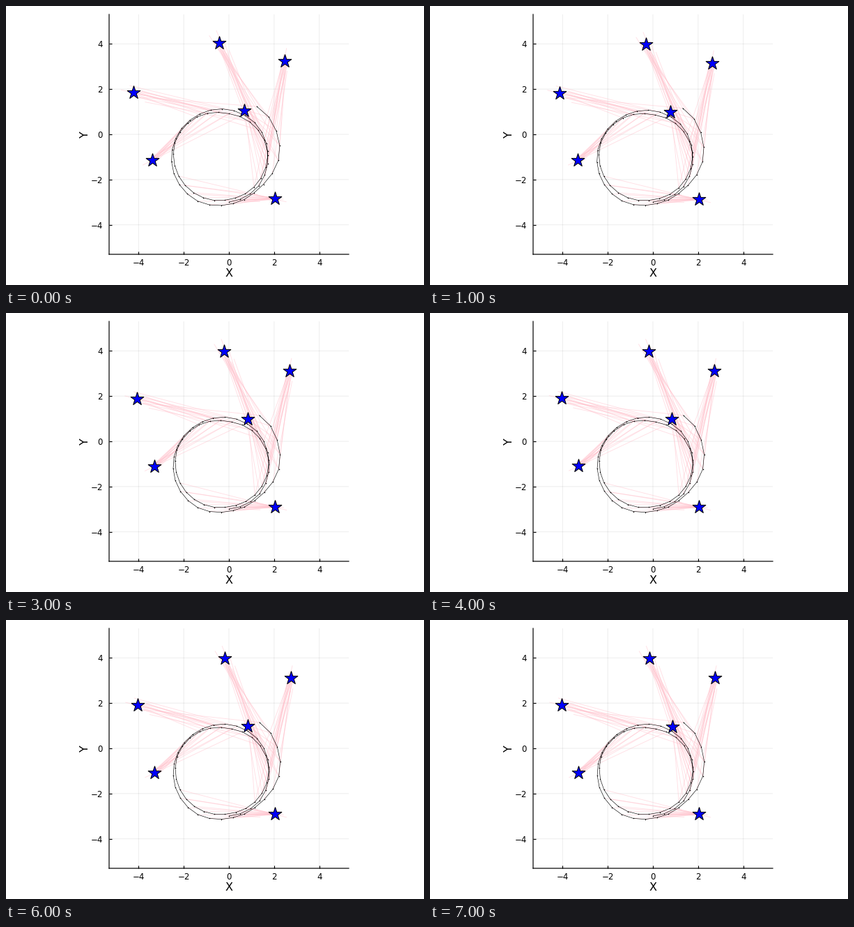
Animation, 600 px wide and 400 px high, one loop 8000 ms. Source, as a matplotlib script:

```python
import numpy as np
import matplotlib.pyplot as plt
from matplotlib.animation import FuncAnimation
from matplotlib.collections import LineCollection

W, H, DPI = 600, 400, 72
FRAMES, INTERVAL = 8, 1000
ORIGIN, SCALE, LIMIT = np.array([320, 184]), 344 / 10.6, 5.3
CENTRE, POSES = np.array([309, 217]), 61
FOV, REACH = np.radians(52), 190
PATH_SETTLE = 0.4  # the path is corrected less than the landmarks

plt.rcParams["font.family"] = "DejaVu Sans"
plt.rcParams["path.snap"] = False


def drive():
    """Nearly circular laps that widen at the end, in stage pixels."""
    angle = np.linspace(-80, 772, POSES)
    radii = [65, 69.5, 69, 66.5, 62.3, 65, 67, 65, 63, 61.5, 65.5, 68.5,
             70, 68.2, 66.6, 68, 69.8, 70.6, 68, 71.5, 84.5, 90, 87]
    radius = np.interp(angle, -80 + 40 * np.arange(len(radii)), radii)
    turn = np.radians(angle)
    ring = np.column_stack([np.cos(turn), -np.sin(turn)])
    return CENTRE + radius[:, None] * ring


def first_step(points):
    """Large correction of the first optimisation step."""
    x, y = points.T
    height = np.clip((281 - y) / 134, 0, None)
    side = np.clip((x - 320) / 75, 0, None)
    return np.column_stack([
        3.1 * np.sqrt(height) - 5 * side ** 3 * height * (1.4 - height),
        1.9 * np.sqrt(height) + 0.012 * (x - 320)])


def later_steps(points):
    """Sum of the small corrections that follow: a shear and a turn."""
    x, y = points.T
    return np.column_stack([2.6 * (281 - y) / 134, 0.02 * (x - 330)])


def estimate(points, k, settle=1):
    """Where converged points stood after k optimisation steps."""
    done = (1 - 0.6 ** max(k - 1, 0)) / (1 - 0.6 ** (FRAMES - 2))
    result = points - settle * (1 - done) * later_steps(points)
    return result - first_step(points) if k == 0 else result


def sightings(path, stars):
    """Pairs of pose and landmark in view, with the error of each sighting."""
    rng = np.random.default_rng(4)
    step = np.gradient(path, axis=0)
    heading = np.arctan2(step[:, 1], step[:, 0])
    pairs, errors = [], []
    for s, star in enumerate(stars):
        for p, pose in enumerate(path):
            ray = star - pose
            turn = np.arctan2(ray[1], ray[0]) - heading[p]
            turn = (turn + np.pi) % (2 * np.pi) - np.pi
            if np.hypot(*ray) > REACH or abs(turn) > FOV:
                continue
            stretch, swing = rng.normal(0, [0.065, 0.025])
            normal = np.array([-ray[1], ray[0]])
            pairs.append((p, s))
            errors.append(stretch * ray + swing * normal)
    return np.array(pairs), np.array(errors)


def world(points):
    return (points - ORIGIN) / SCALE * [1, -1]


path = drive()
stars = np.array([(314.5, 55), (408.7, 83.5), (189.5, 122),
                  (347.5, 152.5), (213, 219), (386.3, 278)])
pairs, errors = sightings(path, stars)

fig = plt.figure(figsize=(W / DPI, H / DPI), dpi=DPI, facecolor="white")
ax = fig.add_axes([148 / W, 44 / H, 344 / W, 344 / H])
ax.set(xlim=(-LIMIT, LIMIT), ylim=(-LIMIT, LIMIT),
       xticks=range(-4, 5, 2), yticks=range(-4, 5, 2))
ax.set_axisbelow(True)
ax.grid(color="black", alpha=0.1, lw=0.7)
ax.spines[["top", "right"]].set_visible(False)
ax.spines[["left", "bottom"]].set_linewidth(1.2)
ax.tick_params(direction="in", length=4, width=1.2, labelsize=11.7)
ax.tick_params(axis="x", pad=6.5)
ax.tick_params(axis="y", pad=9)
fig.text(320 / W, 1 - 384 / H, "X", size=16, ha="center", va="center")
fig.text(113.5 / W, 1 - 184 / H, "Y", size=16, ha="center", va="center",
         rotation=90)

rays = LineCollection([], colors="pink", linewidths=0.9, alpha=0.5, zorder=3)
ax.add_collection(rays)
track, = ax.plot([], [], color="black", lw=0.6, marker="o", ms=1.5,
                 mew=0, zorder=4)
marks = ax.scatter(*world(stars).T, s=20 ** 2, marker="*", c="blue",
                   edgecolors="black", linewidths=1, joinstyle="miter",
                   zorder=5)


def draw(k):
    poses = estimate(path, k, PATH_SETTLE)
    landmarks = estimate(stars, k)
    starts = world(poses[pairs[:, 0]])
    ends = world(landmarks[pairs[:, 1]] + errors)
    rays.set_segments(np.stack([starts, ends], axis=1))
    track.set_data(*world(poses).T)
    marks.set_offsets(world(landmarks))
    return rays, track, marks


anim = FuncAnimation(fig, draw, frames=FRAMES, interval=INTERVAL,
                     repeat=True, repeat_delay=0)
plt.show()
```
